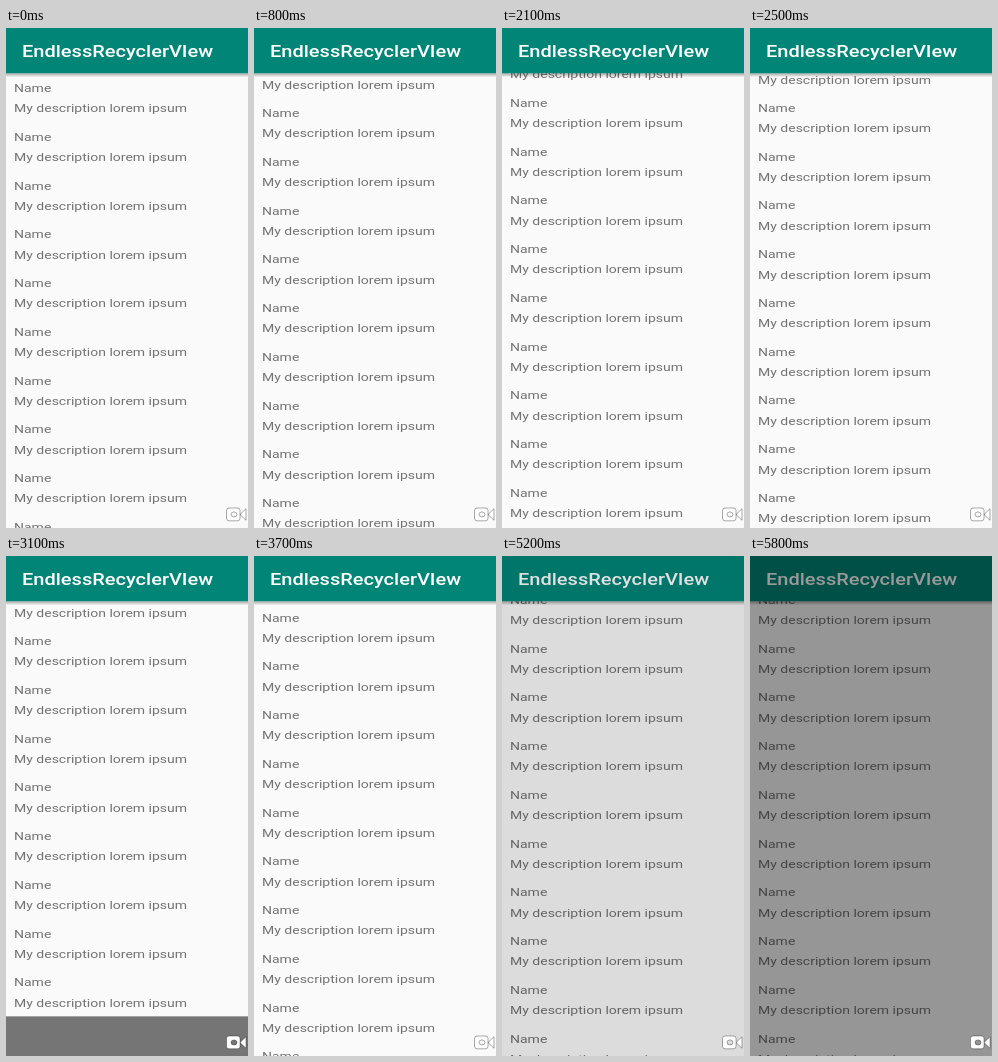
These frames come from a looping animation (242 px wide and 500 px high, 5900 ms). An HTML page with a canvas:

```html
<!DOCTYPE html>
<html lang="en">
<head>
<meta charset="utf-8">
<title>Endless list</title>
<style>
html, body { margin: 0; width: 100%; height: 100%; overflow: hidden; background: #fafafa; }
canvas { display: block; }
</style>
</head>
<body>
<canvas id="stage" width="242" height="500"></canvas>
<script>
const W = 242, H = 500, LOOP = 5900, STEP = 100;
const SQUASH = 0.8125; // the whole screen is flattened vertically
const BAR = 45.3, ROW = 60 * SQUASH, PAGE = 10, FOOTER = 39.65;
const ctx = document.getElementById('stage').getContext('2d');

const pageEnd = pages => BAR + pages * PAGE * ROW + FOOTER - H;
const linear = u => u;
const easeOut = u => 1 - (1 - u) ** 2;
const smooth = u => u * u * (3 - 2 * u);

// time, scroll offset, easing used to arrive there
const scrollKeys = [
  [0, 0],
  [500, pageEnd(1), smooth],
  [800, pageEnd(1), linear],
  [1400, 200.7, linear],
  [2100, 375.3, linear],
  [2900, pageEnd(2), linear],
  [3500, pageEnd(2), linear],
  [4000, 749, easeOut],
  [4200, 749, linear],
  [4300, 769.4, linear],
  [4500, 796.2, easeOut],
  [LOOP, 796.2, linear]
];

function scrollAt(t) {
  const i = scrollKeys.findIndex(key => key[0] > t);
  const [t0, from] = scrollKeys[i - 1];
  const [t1, to, ease] = scrollKeys[i];
  return from + (to - from) * ease((t - t0) / (t1 - t0));
}

const pagesAt = t => t < 800 ? 1 : t < 3400 ? 2 : 3;

function label(text, x, baseline, font, color) {
  ctx.save();
  ctx.translate(x, baseline);
  ctx.scale(1, SQUASH);
  ctx.font = font + ' Roboto, sans-serif';
  ctx.fillStyle = color;
  ctx.fillText(text, 0, 0);
  ctx.restore();
}

function drawList(t) {
  const scroll = scrollAt(t);
  const count = pagesAt(t) * PAGE;
  for (let i = 0; i < count; i++) {
    const top = BAR + i * ROW - scroll;
    if (top < -ROW || top > H) continue;
    label('Name', 8, top + 18.8, '14px', '#737373');
    label('My description lorem ipsum', 8, top + 39.1, '14px', '#737373');
  }
  ctx.fillStyle = '#757575';
  ctx.fillRect(0, BAR + count * ROW - scroll, W, FOOTER);
}

function drawToolbar() {
  const shade = ctx.createLinearGradient(0, BAR, 0, BAR + 4);
  shade.addColorStop(0, 'rgba(0,0,0,.32)');
  shade.addColorStop(1, 'rgba(0,0,0,0)');
  ctx.fillStyle = shade;
  ctx.fillRect(0, BAR, W, 4);
  ctx.fillStyle = '#008577';
  ctx.fillRect(0, 0, W, BAR);
  label('EndlessRecyclerVIew', 16, 28.8, '500 20px', '#fff');
}

function drawCamera() {
  const shape = new Path2D();
  shape.roundRect(220.5, 480, 13.5, 12.8, 2.5);
  shape.moveTo(234, 486.5);
  shape.lineTo(240, 480.8);
  shape.lineTo(240, 492.2);
  shape.closePath();
  shape.moveTo(231, 486.4);
  shape.ellipse(228, 486.4, 3, 2.5, 0, 0, Math.PI * 2);
  ctx.fillStyle = '#fff';
  ctx.fill(shape, 'evenodd');
  ctx.strokeStyle = 'rgba(0,0,0,.33)';
  ctx.lineWidth = 1;
  ctx.stroke(shape);
}

function draw(t) {
  ctx.fillStyle = '#fafafa';
  ctx.fillRect(0, 0, W, H);
  drawList(t);
  drawToolbar();
  const dim = Math.min(1, Math.max(0, (t - 5100) / 600));
  ctx.fillStyle = `rgba(0,0,0,${0.4 * easeOut(dim)})`;
  ctx.fillRect(0, 0, W, H);
  drawCamera();
}

const start = performance.now();
function tick() {
  const t = (performance.now() - start) % LOOP;
  draw(Math.floor(t / STEP) * STEP);
  requestAnimationFrame(tick);
}
tick();
</script>
</body>
</html>
```
